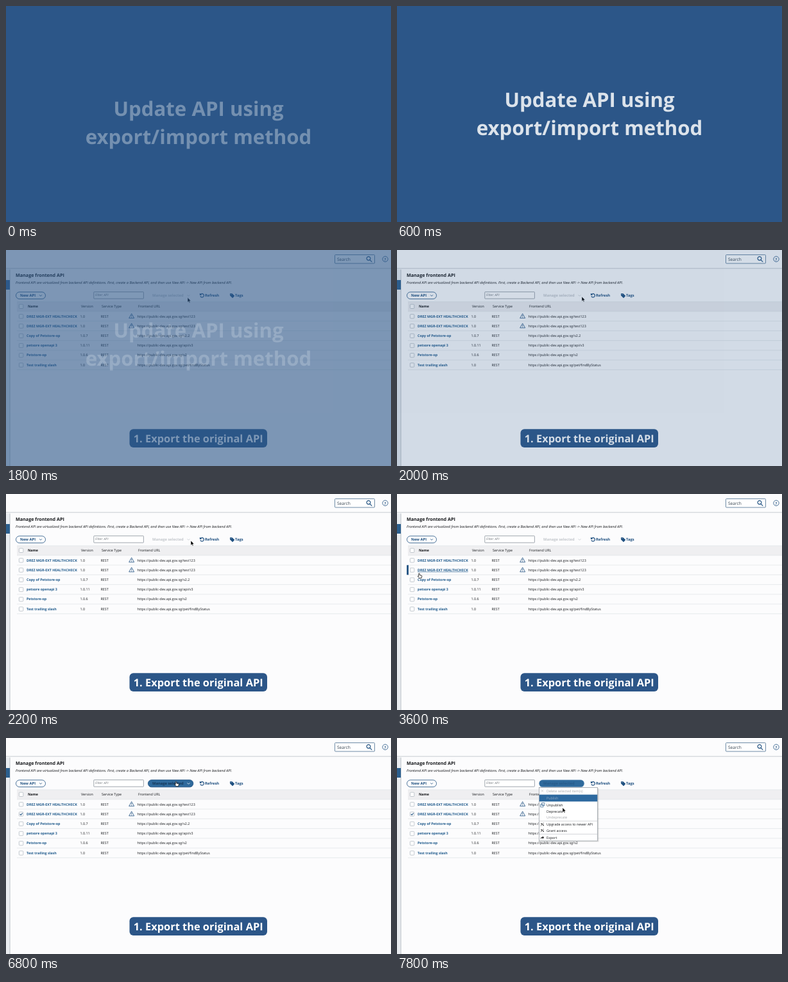
Recreate the animation shown at these times as an HTML page. Size 600 by 338 pixels, loop 8 s.

```html
<!DOCTYPE html>
<html lang="en">
<head>
<meta charset="utf-8">
<title>Update API using export/import method</title>
<style>
  html, body { margin: 0; height: 100%; overflow: hidden; background: #2c5688; }
  svg { display: block; width: 100vw; height: 100vh; }
  text { font: 5.37px "Open Sans", sans-serif; fill: #16181b; text-rendering: geometricPrecision; white-space: pre; }
  .bold { font-weight: 700; }
  .link { font-weight: 700; fill: #1f5a8c; }
  .button { font-weight: 700; font-size: 5.8px; fill: #1f5080; }
  .heading { font-weight: 700; font-size: 7.2px; }
  .intro { font-style: italic; font-size: 5.6px; }
  .hint { font-style: italic; font-size: 5px; fill: #70757b; }
  .search { font-size: 6.6px; fill: #33404d; }
  .off { fill: #a3a6aa; }
  .title { font-weight: 700; font-size: 31.2px; fill: #fff; text-anchor: middle; }
  .banner { font-weight: 700; font-size: 16.4px; fill: #fff; text-anchor: middle; }
  .line { fill: none; stroke: #1f5080; stroke-width: .8; }
  .rule { stroke: #dfe2e6; stroke-width: .7; }
</style>
</head>
<body>
<svg id="stage" viewBox="0 0 600 338" preserveAspectRatio="none"></svg>
<script>
const stage = document.getElementById('stage');
const LOOP = 8000, STEP = 200;
const HOST = 'https://public-dev.api.gov.sg/';

const rows = [
  ['DREZ MGR-EXT HEALTHCHECK', '1.0', 'test123', true],
  ['DREZ MGR-EXT HEALTHCHECK', '1.0', 'test123', true],
  ['Copy of Petstore-op', '1.0.7', 'v2.2'],
  ['petsore openapi 3', '1.0.11', 'api/v3'],
  ['Petstore-op', '1.0.6', 'v2'],
  ['Test trailing slash', '1.0', 'pet/findByStatus'],
];
// label, vertical centre, disabled
const menuItems = [
  ['Delete selected item(s)', 82.7, true],
  ['Publish', 94, true],
  ['Unpublish', 104.7],
  ['Deprecate', 114.6],
  ['Undeprecate', 124.4, true],
  ['Upgrade access to newer API', 135.2],
  ['Grant access', 144.7],
  ['Export', 156],
];

const text = (x, y, str, cls = '', extra = '') =>
  `<text x="${x}" y="${y}" class="${cls}" ${extra}>${str.replace('>', '&gt;')}</text>`;
const rect = (x, y, w, h, fill, extra = '') =>
  `<rect x="${x}" y="${y}" width="${w}" height="${h}" fill="${fill}" ${extra}/>`;
const path = (d, extra = 'class="line"') => `<path d="${d}" ${extra}/>`;
const rule = y => path(`M17 ${y}H600`, 'class="rule"');
const checkbox = y => rect(20.4, y - 3.2, 6.4, 6.4, '#fff', 'rx="1" stroke="#aab2bb" stroke-width=".7"');
const chevron = (x, id = '') => path(`M${x - 2} 70.2l2 2 2-2`, `class="line" ${id}`);

const row = ([name, version, url, warn], i) => {
  const y = 103.6 + i * 15.24, base = y + 1.9;
  return checkbox(y + .2) + text(32, base, name, 'link', `id="name${i}"`) +
    text(115.5, base, version) + text(147.5, base, 'REST') + text(204.5, base, HOST + url) +
    (warn ? path(`M195.7 ${y - 4}l4 7h-8zM195.7 ${y - 1.6}v2.3m0 .7v.7`) : '') + rule(y + 7.6);
};

const menu = () => {
  const separator = y => path(`M222 ${y}H312`, 'stroke="#c2c5c9" stroke-width=".7"');
  const people = y => path(`M224 ${y + 2.5}l4.5-5M225 ${y - 2}l1 2.4m1.4-.4l1.2 2.4M224 ${y - 1}h2m1 2h2`,
    'fill="none" stroke="#333" stroke-width=".8"');
  return rect(222, 78.5, 92.5, 84, '#000', 'opacity=".13"') +
    rect(221.4, 77.4, 91.2, 83.6, '#fff', 'stroke="#8d949c" stroke-width=".7"') +
    rect(221.8, 88.6, 90.4, 10.8, '#2d699f', 'id="highlight"') +
    menuItems.map(([str, y, off], i) => text(233, y + 1.9, str, off ? 'off' : '', `id="item${i}"`)).join('') +
    separator(130) + separator(150.4) +
    path('M225.5 101.5h4.5v4h-4.5zM223.5 104h4.5v4h-4.5z', 'fill="#fff" stroke="#46729b" stroke-width=".8"') +
    people(135.2) + people(144.7) +
    path('M223.5 158q.5-3 3.3-3v-1.4l2.4 2.2-2.4 2.1v-1.3q-2 0-3.3 1.4z', 'fill="#222"') +
    path('M225 81.2l3 3m0-3l-3 3', 'stroke="#bbb" stroke-width=".7"');
};

stage.innerHTML = `
  <defs>
    <linearGradient id="shade" x2="0" y2="1"><stop stop-color="#cfd3d8"/><stop offset="1" stop-color="#fcfcfd"/></linearGradient>
  </defs>` +
  rect(0, 0, 600, 338, '#fcfcfd') +
  rect(0, 29, 6, 309, '#e9ecf0') + rect(5.4, 29, 1.2, 309, '#c3c8ce') + rect(0, 47, 6, 15, '#2c5f8e') +
  rect(0, 28, 600, 2.5, 'url(#shade)') +
  rect(512.5, 7.5, 62, 13.5, '#fff', 'rx="1" stroke="#4b6e90" stroke-width=".8"') +
  text(516, 16.8, 'Search', 'search') +
  path('M567.2 15.6l3 3M567.9 13.2a2.9 2.9 0 1 1-5.8 0a2.9 2.9 0 1 1 5.8 0', 'class="line" style="stroke-width:1.2"') +
  '<circle cx="591" cy="14.2" r="4.2" class="line"/>' + text(589.5, 16.6, '?', 'button') +
  text(15, 41.6, 'Manage frontend API', 'heading') +
  text(15, 53, 'Frontend API are virtualized from backend API definitions. First, create a Backend API, ' +
    'and then use New API -> New API from backend API.', 'intro') +
  rect(15.5, 65.8, 46, 10.8, '#fff', 'rx="5.4" stroke="#1f5080" stroke-width=".8"') +
  text(22, 73.3, 'New API', 'button') + chevron(54) +
  rect(136.8, 65.6, 77.6, 10.6, '#fff', 'rx=".6" stroke="#8a929b" stroke-width=".8"') +
  text(139, 72.4, 'Filter: API', 'hint') +
  rect(221.4, 65.6, 70.4, 11.2, '#fff', 'rx="5.5" stroke-width=".8" id="manage"') +
  text(228, 73.3, 'Manage selected', 'button', 'id="manageText"') + chevron(284.5, 'id="manageArrow"') +
  path('M303.2 69.6a2.8 2.8 0 1 1-.3 2.6M302.5 68v2.2h2.2', 'class="line" style="stroke-width:1.2"') +
  text(310, 73.3, 'Refresh', 'button') +
  path('M349 68h3.3l4 3.8-3.2 3.4-4.1-3.9zM350.4 69.1v.8h.8v-.8z', 'fill="#1f5080" fill-rule="evenodd"') +
  text(357, 73.3, 'Tags', 'button') +
  rect(17, 81, 583, 15, '#efeff1') + path('M17 81H600', 'class="rule"') + rule(96) + checkbox(88.3) +
  text(34, 90, 'Name', 'bold') + text(117, 90, 'Version') + text(149, 90, 'Service Type') + text(206, 90, 'Frontend URL') +
  rows.map(row).join('') +
  rect(15.2, 111.3, 2.8, 15.2, '#1f5080', 'id="bar"') +
  path('M21.8 119l1.4 1.5 2.5-3', 'class="line" id="check" style="stroke-width:1.1"') +
  `<g id="menu">${menu()}</g>` +
  rect(192.5, 280.3, 214.5, 28.8, '#2c5688', 'rx="6"') + text(299.7, 300.8, '1. Export the original API', 'banner') +
  '<g id="cursor">' +
  path('M0 0V7.2L1.7 5.7 2.8 8.2 4 7.7 2.9 5.2H5.2Z', 'id="arrow" fill="#000" stroke="#fff" stroke-width=".5"') +
  path('M-.8.6Q0-.5.8.6V2.9L3.7 3.5Q4.5 3.8 4.3 4.9L3.6 7.6H.2L-2.2 4.8Q-1.9 3.9-.8 4.7Z',
    'id="hand" fill="#fff" stroke="#111" stroke-width=".8"') +
  '</g><g id="cover">' + rect(0, 0, 600, 338, '#2c5688') +
  '<g id="title">' + text(300, 153, 'Update API using', 'title') + text(300, 197, 'export/import method', 'title') + '</g></g>';

const el = Object.fromEntries([...stage.querySelectorAll('[id]')].map(node => [node.id, node]));
const show = (node, on) => node.style.display = on ? '' : 'none';
const clamp = u => Math.min(1, Math.max(0, u));
const progress = (t, from, to) => clamp((t - from) / (to - from));
const smooth = u => u * u * (3 - 2 * u);

// time, x, y of the pointer tip
const track = [
  [1400, 274, 77], [1600, 278, 76], [2000, 288, 73], [2500, 288, 73], [3600, 34.5, 124], [3700, 34.5, 124],
  [4400, 23.6, 118], [5800, 23.6, 118], [6700, 265, 68], [7200, 265, 68], [7800, 258, 109],
];
function pointer(t) {
  const next = track.findIndex(k => k[0] > t);
  if (next < 1) return (next ? track.at(-1) : track[0]).slice(1);
  const [a, b] = [track[next - 1], track[next]];
  const u = smooth(progress(t, a[0], b[0]));
  return [a[1] + (b[1] - a[1]) * u, a[2] + (b[2] - a[2]) * u];
}

function draw(t) {
  const enter = 1 - (1 - progress(t, 0, 1200)) ** 2;
  const leave = progress(t, 1400, 1900) ** 2;
  el.title.setAttribute('transform', `translate(0 ${19 * (1 - enter) - 25 * leave})`);
  el.title.style.opacity = clamp(.34 + .66 * enter - 1.25 * leave);
  el.cover.style.opacity = 1 - smooth(progress(t, 1500, 2200));

  const onLink = t >= 3400 && t < 4000;
  const enabled = t >= 5000, hover = t >= 6600, open = t >= 7200, picking = t >= 7600;
  const hand = onLink || (hover && t < 7400);
  el.cursor.setAttribute('transform', `translate(${pointer(t)})`);
  show(el.arrow, !hand);
  show(el.hand, hand);
  show(el.bar, t >= 3400 && t < 6000);
  show(el.check, enabled);
  el.name1.style.textDecoration = onLink ? 'underline' : 'none';

  el.manage.style.fill = hover ? '#2f6a9c' : enabled ? '#fff' : 'none';
  el.manage.style.stroke = open ? '#a9c3da' : enabled ? '#1f5080' : 'none';
  el.manage.style.strokeDasharray = open ? '1 1' : '';
  el.manageText.style.fill = open ? '#285b89' : hover ? '#17395a' : enabled ? '#1f5080' : '#c3c7cc';
  el.manageArrow.style.stroke = open ? 'none' : hover ? '#fff' : enabled ? '#1f5080' : '#c3c7cc';

  show(el.menu, open);
  show(el.highlight, picking);
  el.item1.style.fill = picking ? '#8fa9c2' : '';
}

const start = performance.now();
function tick() {
  const t = (performance.now() - start) % LOOP;
  draw(Math.floor(t / STEP) * STEP);
  requestAnimationFrame(tick);
}
tick();
</script>
</body>
</html>
```
